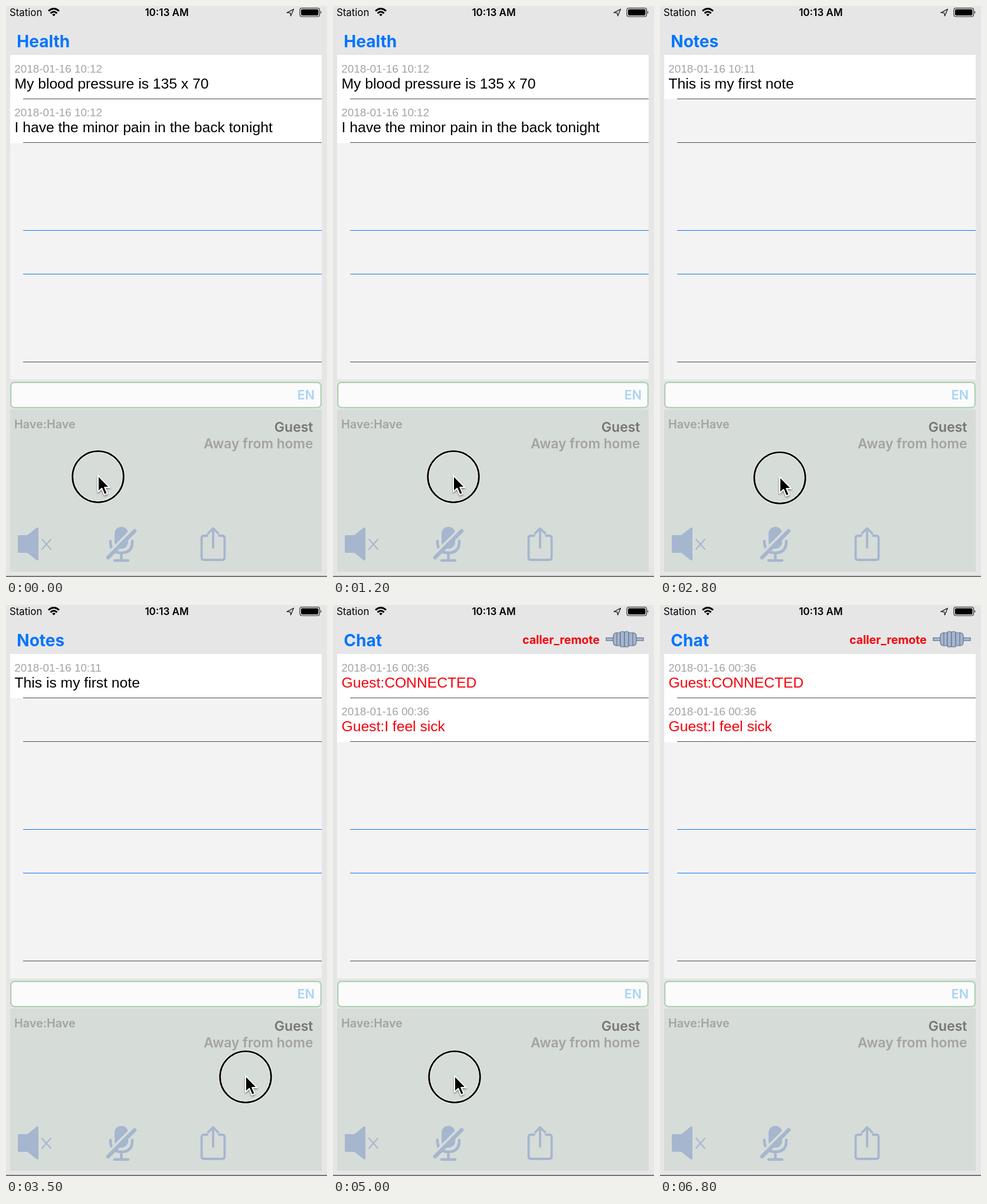
An HTML page that plays this animation: 544 px wide and 968 px high, repeating every 6900 ms.

```html
<!DOCTYPE html>
<html lang="en">
<head>
<meta charset="utf-8">
<title>Swiping between lists</title>
<style>
  html, body { margin: 0; width: 100%; height: 100%; overflow: hidden; background: #e6e6e6; }
  svg { display: block; width: 544px; height: 968px; }
  text { font-family: Inter, sans-serif; white-space: pre; }
  .b { font-weight: 700; }
  .sb { font-weight: 600; }
  .end { text-anchor: end; }
  #rows text { font-family: "Liberation Sans", Arial, sans-serif; font-size: 24.66px; }
  #rows .date { font-size: 18.86px; fill: #a3a3a3; }
</style>
</head>
<body>
<svg viewBox="0 0 544 968">
  <rect width="544" height="968" fill="#e6e6e6"/>

  <!-- status bar -->
  <text x="6" y="17" font-size="16.8">Station</text>
  <g fill="none" stroke="#000" stroke-width="3">
    <path d="M72 8.5Q81 .5 90 8.5M75.5 12.3Q81 7.2 86.5 12.3"/>
    <path d="M78.2 14.5Q81 12 83.8 14.5L81 17.5Z" fill="#000" stroke="none"/>
  </g>
  <text class="sb" x="272.5" y="17" font-size="17" text-anchor="middle">10:13 AM</text>
  <path d="M476 11.3L487.5 5.3L482.6 17L481.6 11.6Z" fill="none" stroke="#222" stroke-width="1.3" stroke-linejoin="round"/>
  <rect x="498" y="3.5" width="33.5" height="14.5" rx="3.5" fill="none" stroke="#222" stroke-width="1.1"/>
  <rect x="500" y="5.5" width="29.5" height="10.5" rx="2" fill="#000"/>
  <path d="M533 8.2Q535.6 10.7 533 13.2Z" fill="#222"/>

  <text id="title" class="b" x="18.3" y="70" font-size="28" fill="#0075ff"></text>
  <g id="link">
    <text class="b end" x="452" y="66" font-size="19.6" fill="#f5000c">caller_remote</text>
    <g fill="#a6b6ce" stroke="#63738c" stroke-width="1.2">
      <path d="M463 55.5H476V60.5H463ZM513 55.5H526V60.5H513Z"/>
      <path d="M487 47H480Q475 48 475 53V63Q475 68 480 69H487Z"/>
      <path d="M501 47H509Q514 48 514 53V63Q514 68 509 69H501Z"/>
      <path d="M481 47V69M508 47V69"/>
      <rect x="487" y="45" width="7" height="26" rx="2"/>
      <rect x="494" y="45" width="7" height="26" rx="2"/>
    </g>
  </g>

  <!-- list -->
  <rect x="7" y="83" width="528" height="550" fill="#f3f3f3"/>
  <g id="rows"></g>
  <path d="M29 157.5H535M29 231.5H535M29 603.5H535" stroke="#4c4c4c"/>
  <path d="M29 380.5H535M29 454.5H535" stroke="#0a75f5"/>

  <!-- input and panel -->
  <rect x="8.2" y="638.2" width="525.6" height="42.6" rx="6" fill="#fbfbfb" stroke="#acd0b1" stroke-width="2.2"/>
  <text class="sb end" x="523" y="667" font-size="21.5" fill="#a8d4f2">EN</text>
  <rect x="7" y="684" width="528" height="275" fill="#d6dcd8"/>
  <rect y="966" width="544" height="2" fill="#777"/>
  <text class="sb" x="14" y="716" font-size="19.8" fill="#a2a3a2">Have:Have</text>
  <text class="sb end" x="520.5" y="722" font-size="23" fill="#757675">Guest</text>
  <text class="sb end" x="520.5" y="750" font-size="22.8" fill="#a2a3a2">Away from home</text>

  <g fill="none" stroke="#a6b6ce" stroke-linecap="round" stroke-linejoin="round">
    <path d="M22 899H37L53 886V938L37 925H22Z" fill="#a6b6ce" stroke-width="4"/>
    <path d="M61 904L76 921M76 904L61 921" stroke-width="2"/>
    <rect x="184" y="883" width="23" height="37" rx="11.5" fill="#a6b6ce" stroke="none"/>
    <path d="M177 907V910Q178 927 195.5 927Q213 927 214 910V907M195.5 928V939M184 940H207" stroke-width="4.5"/>
    <path d="M170 931L215 886" stroke="#d6dcd8" stroke-width="4"/>
    <path d="M173 935L218 890" stroke-width="6.5"/>
    <path d="M341 898H336Q331.500 898 331.500 902V935Q331.500 939 336 939H366Q370.500 939 370.500 935V902Q370.500 898 366 898H361" stroke-width="3.8"/>
    <path d="M351 918V886M342.500 894L351 885.500L359.500 894" stroke-width="3.8"/>
  </g>

  <g id="pointer">
    <g id="ring" fill="none">
      <circle r="43.3" stroke="#fff" stroke-opacity=".45" stroke-width="5.500"/>
      <circle r="43.3" stroke="#000" stroke-width="2.800"/>
    </g>
    <path id="arrow" d="M0 -2V25.500L6.300 19.700L10.800 30.500L15.800 28.400L11.300 18H19.500Z"
      stroke="#fff" stroke-width="2" stroke-linejoin="round" style="filter:drop-shadow(0 2px 1.500px #0006)"/>
  </g>
</svg>
<script>
const LOOP = 6900, STEP = 100, ROW = 74.35;
const $ = id => document.getElementById(id);

const health = { title: "Health", date: "2018-01-16 10:12",
  rows: ["My blood pressure is 135 x 70", "I have the minor pain in the back tonight"] };
const notes = { title: "Notes", date: "2018-01-16 10:11", rows: ["This is my first note"] };
const shopping = { title: "Shopping", date: "2018-01-16 10:11", rows: ["Milk", "Sugar"] };
const chat = { title: "Chat", date: "2018-01-16 00:36", color: "#f5000c",
  rows: ["Guest:CONNECTED", "Guest:I feel sick"] };

const pages = [[0, health], [2600, notes], [3800, shopping], [4800, chat]];
const presses = [[0, 1500], [2300, 2900], [3400, 4000], [4500, 5300]];
const hideAt = 6000;
// pointer path: time, x, y
const path = [
  [0, 156, 798], [700, 156, 798], [1200, 204, 798], [1500, 210, 798],
  [2100, 412, 799], [2200, 412, 799], [2300, 408, 800], [2700, 206, 800],
  [2900, 200, 800], [3300, 406, 800], [3500, 406, 800], [3900, 204, 799],
  [4000, 204, 798], [4300, 346, 797], [4500, 404, 800], [4600, 404, 800],
  [5000, 206, 800], [LOOP, 206, 800]
];

function pointerAt(t) {
  const i = path.findIndex(p => p[0] > t);
  const [t0, x0, y0] = path[i - 1], [t1, x1, y1] = path[i];
  const u = (t - t0) / (t1 - t0), k = u * u * (3 - 2 * u);
  return [x0 + (x1 - x0) * k, y0 + (y1 - y0) * k];
}

let shown;
function showPage(page) {
  if (page === shown) return;
  shown = page;
  $("title").textContent = page.title;
  $("link").style.display = page === chat ? "" : "none";
  $("rows").innerHTML = page.rows.map((row, i) => `
    <rect x="7" y="${83 + i * 74.5}" width="528" height="75" fill="#fff"/>
    <text class="date" x="14.2" y="${112.5 + i * ROW}">${page.date}</text>
    <text x="14.500" y="${139.5 + i * ROW}" fill="${page.color || "#000"}">${row}</text>`).join("");
}

function draw(now) {
  const t = Math.floor((now % LOOP) / STEP) * STEP;
  showPage(pages.filter(p => p[0] <= t).pop()[1]);
  const [x, y] = pointerAt(t);
  $("pointer").setAttribute("transform", `translate(${x} ${y})`);
  $("pointer").style.display = t < hideAt ? "" : "none";
  $("ring").style.display = presses.some(([a, b]) => t >= a && t < b) ? "" : "none";
}

let start;
function tick(now) {
  start ??= now;
  draw(now - start);
  requestAnimationFrame(tick);
}
draw(0);
requestAnimationFrame(tick);
</script>
</body>
</html>
```
